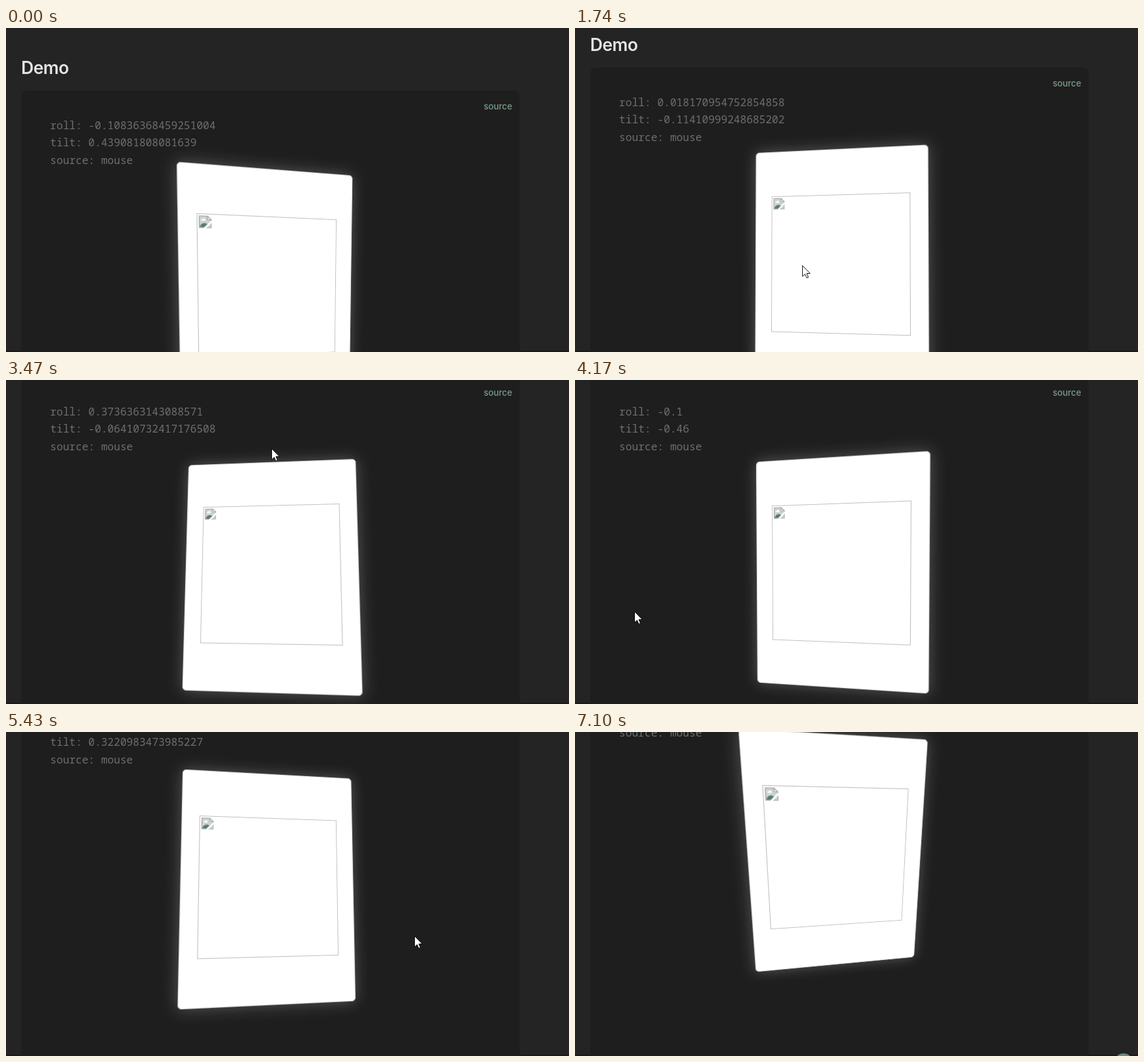
These frames come from a looping animation (855 by 493 pixels, 7170 ms). An HTML page:

```html
<!DOCTYPE html>
<html lang="en">
<head>
<meta charset="utf-8">
<title>Parallax card demo</title>
<style>
  html, body { margin: 0; width: 100%; height: 100%; overflow: hidden; background: #242424; }
  #stage { position: absolute; left: 0; top: 0; width: 855px; height: 493px; overflow: hidden; }
  #page { position: absolute; left: 0; top: 0; }
  #page > svg, #overlay { position: absolute; left: 0; top: 0; }
  #edge { position: absolute; left: 0; top: 491px; width: 855px; height: 2px; background: #1f181b; }
  #scene { position: absolute; left: 269.4px; top: 218.3px; width: 264px; height: 352px; perspective: 330px; }
  #card {
    position: absolute; box-sizing: border-box; width: 264px; height: 352px;
    background: #fff; border: 1px solid #cdcdcd; border-radius: 5.5px;
    box-shadow: 0 0 22px 0 rgba(255, 255, 255, .25);
  }
  #picture {
    position: absolute; box-sizing: border-box; width: 211.2px; height: 211.2px;
    left: calc(50% - 105.6px); top: calc(50% - 105.6px); border: 1px solid #c0c0c0;
  }
  #picture svg { position: absolute; left: 2px; top: 2px; }
  .mono { font: 500 16.13px "Noto Sans Mono", monospace; fill: #6e6e6e; white-space: pre; }
  .title { font: 600 26.4px Inter, sans-serif; letter-spacing: -.02em; fill: #e2e4e2; }
  .link { font: 500 13.2px Inter, sans-serif; fill: #7a9c89; }
</style>
</head>
<body>
<div id="stage">
  <div id="edge"></div>
  <div id="page">
    <svg width="855" height="760">
      <text class="title" x="23" y="70">Demo</text>
      <rect x="23" y="95" width="757" height="680" rx="8.8" fill="#1e1e1e"/>
      <text class="link" x="725.5" y="124">source</text>
      <text class="mono" id="roll" x="67.1" y="153.9"></text>
      <text class="mono" id="tilt" x="67.1" y="180.2"></text>
      <text class="mono" x="67.1" y="206.7">source: mouse</text>
    </svg>
    <div id="scene">
      <div id="card">
        <div id="picture">
          <svg width="17.6" height="17.6" viewBox="0 0 16 16">
            <path d="M.5.5H11L15.5 5V15.5H.5Z" fill="#cdd2d2" stroke="#a2a5a4"/>
            <path d="M11 .5V5H15.5Z" fill="#fff" stroke="#a2a5a4"/>
            <path d="M3 6.5a1.6 1.6 0 0 1 1.5-2 2 2 0 0 1 3.6.6 1 1 0 0 1 0 1.4Z" fill="#fff"/>
            <path d="M1 15C2.5 9.5 7 8 11 11L7 15Z" fill="#587d66"/>
            <path d="M16.5 7L7 16.5" stroke="#fff" stroke-width="2.4"/>
          </svg>
        </div>
      </div>
    </div>
  </div>
  <svg id="overlay" width="855" height="493">
    <circle id="dot" cx="833" cy="503.5" r="14.5" fill="#6d8a74"/>
    <path id="cursor" d="M0 0V16.5L3.8 13 6.4 18.8 8.9 17.7 6.4 12H11.6Z" fill="#fff" stroke="#000" stroke-width=".9"/>
  </svg>
</div>
<script>
const LOOP = 7170;
const LEAD = 40;    // the cursor runs ahead of the readings
const TRAIL = 150;  // the card follows behind them
const TURN = 20;    // degrees per unit of roll or tilt
const $ = id => document.getElementById(id);

// Turning points of the mouse: time, roll, tilt
const path = [
  [0, -0.10836368459251004, 0.439081808081639],
  [200, -.06, .573],
  [690, .3, .05],
  [890, .28, -.135],
  [1040, 0.28163633921120235, -0.21634607437582043],
  [1400, .05, -.35],
  [1950, 0, 0],
  [2200, -.046, -.102],
  [2350, -0.07836371327903524, -0.3541622061394916],
  [2840, -.05, .21],
  [3320, .2045, -.1835],
  [3470, 0.3736363143088571, -0.06410732417176508],
  [3620, .3, .19],
  [4170, -.1, -.46],
  [4570, 0.41163631662819317, -0.14743800849398486],
  [4910, 0.41163631662819317, -0.14743800849398486],
  [5280, .148, .2755],
  [5430, 0, 0.3220983473985227],
  [6130, -.1, .2],
  [6750, -.4825, .4185]
];

// Smooth curve through column k of the path, without overshoot
function along(t, k) {
  const last = path.length - 1;
  if (t <= path[0][0]) return path[0][k];
  if (t >= path[last][0]) return path[last][k];
  const i = path.findIndex(p => p[0] > t) - 1;
  const slope = j => j < 0 || j >= last ? 0
    : (path[j + 1][k] - path[j][k]) / (path[j + 1][0] - path[j][0]);
  const tangent = j => {
    const a = slope(j - 1), b = slope(j);
    return a * b > 0 ? 2 * a * b / (a + b) : 0;
  };
  const [from, to] = [path[i], path[i + 1]];
  const span = to[0] - from[0], u = (t - from[0]) / span, v = 1 - u;
  return from[k] + (to[k] - from[k]) * u * u * (3 - 2 * u)
    + span * u * v * (tangent(i) * v - tangent(i + 1) * u);
}
const mouse = t => ({ roll: along(t, 1), tilt: along(t, 2) });

function ramp(t, from, to) {
  const u = Math.min(1, Math.max(0, (t - from) / (to - from)));
  return u * u * (3 - 2 * u);
}

// Down, back to the top, then further down
const scrollAt = t => Math.round(
  100 * ramp(t, 1600, 1950) - 99 * ramp(t, 4450, 4870) + 199 * ramp(t, 5000, 5607));

// Screen height at which the mouse reads zero roll
const zeroY = t => 406 - 100 * ramp(t, 1600, 1950) - 100 * ramp(t, 5430, 5990);

// The picture advances in 70 ms steps with a few longer holds
function stepTime(t) {
  const step = (from, max) => from + 70 * Math.min(max, Math.floor((t - from) / 70));
  if (t < 130) return 0;
  if (t < 2210) return step(130, 26);
  return t < 7100 ? step(2210, 67) : 7100;
}

function draw(now) {
  const t = stepTime(now % LOOP);
  const reading = mouse(t), card = mouse(t - TRAIL), tip = mouse(t + LEAD);
  const x = Math.round(401 + 686.4 * tip.tilt), y = Math.round(zeroY(t) - 550 * tip.roll);

  $('page').style.transform = `translateY(${-scrollAt(t)}px)`;
  $('card').style.transform = `rotateX(${TURN * card.roll}deg) rotateY(${TURN * card.tilt}deg)`;
  $('roll').textContent = `roll: ${reading.roll}`;
  $('tilt').textContent = `tilt: ${reading.tilt}`;
  $('cursor').setAttribute('transform', `translate(${x - .5} ${y - .5})`);
  $('cursor').style.display = t >= 130 && t < 6700 ? '' : 'none';
  $('dot').style.display = t >= 7100 ? '' : 'none';
}

function tick() {
  draw(performance.now());
  requestAnimationFrame(tick);
}
tick();
</script>
</body>
</html>
```
